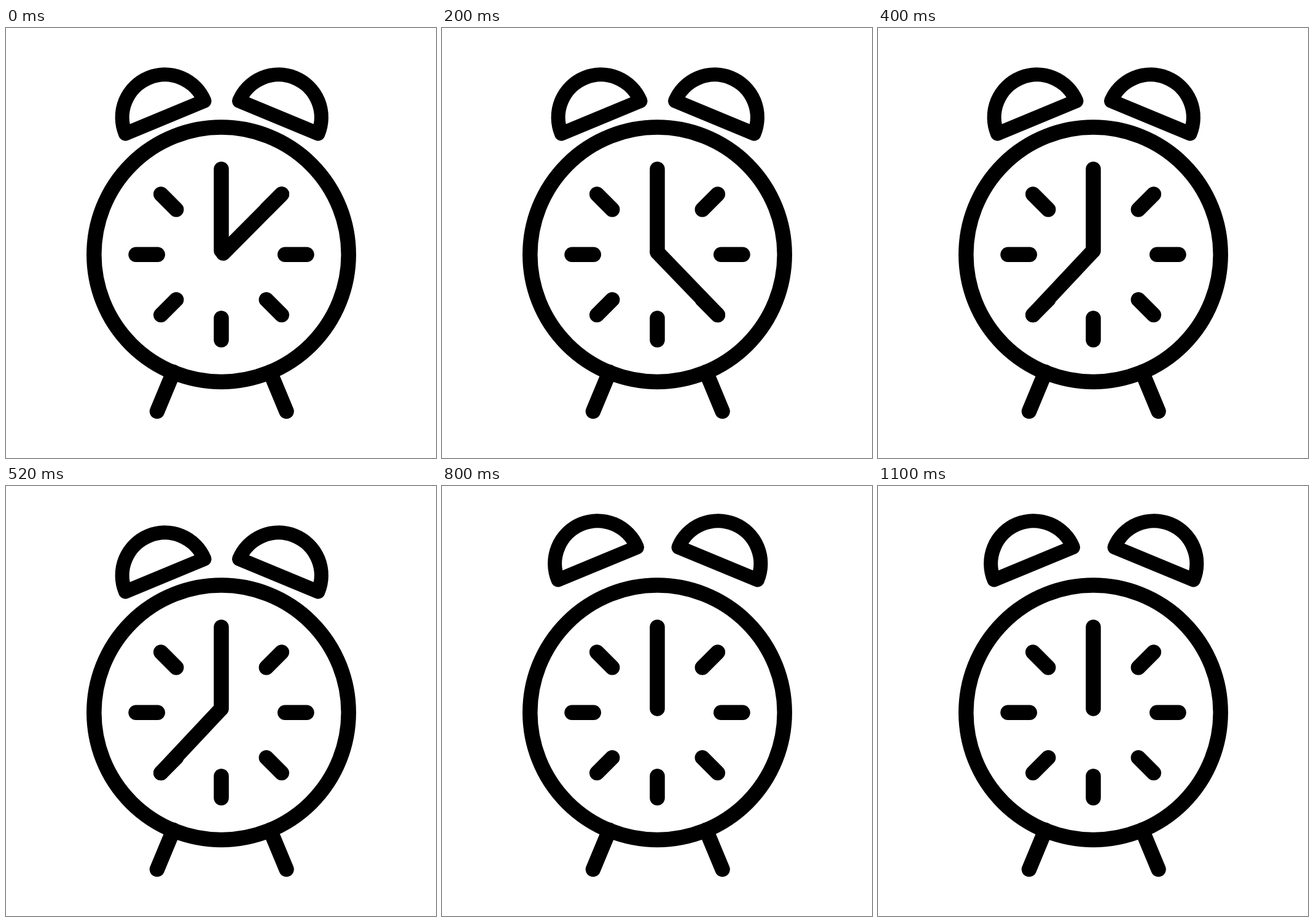
Recreate the animation shown at these times as an HTML page with a canvas. Size 700 by 700 pixels, loop 1200 ms.

```html
<!DOCTYPE html>
<html lang="en">
<head>
<meta charset="utf-8">
<title>Alarm clock</title>
<style>
  html, body { margin: 0; width: 100%; height: 100%; overflow: hidden; background: #fff; }
  canvas { display: block; width: 100vw; height: 100vh; object-fit: contain; }
</style>
</head>
<body>
<canvas id="stage" width="700" height="700"></canvas>
<script>
const ctx = document.getElementById('stage').getContext('2d');
const LOOP = 1200;
const STEP = 200;
const CENTER = { x: 350.5, y: 368.8 };
const MIRROR_X = 351.25;
const TICK_INNER = 103.7;
const TICK_OUTER = 139;

// Inner end of the moving hand at each of its four stops.
const HAND_PIVOTS = [[353.5, 366.5], [350.5, 365], [349.8, 363.2], [349.5, 370]];

function line(x1, y1, x2, y2) {
  ctx.beginPath();
  ctx.moveTo(x1, y1);
  ctx.lineTo(x2, y2);
  ctx.stroke();
}

function onDial(radius, eighth) {
  const angle = eighth * Math.PI / 4;
  return [CENTER.x + radius * Math.sin(angle), CENTER.y - radius * Math.cos(angle)];
}

function mirrored(draw) {
  draw();
  ctx.save();
  ctx.translate(2 * MIRROR_X, 0);
  ctx.scale(-1, 1);
  draw();
  ctx.restore();
}

// A half disc, tilted by an eighth of a half turn.
function bell(raised) {
  const x = raised ? 253.2 : 258.7;
  const y = raised ? 126.3 : 145.4;
  const tilt = -Math.PI / 8;
  ctx.lineWidth = 23.2;
  ctx.beginPath();
  ctx.arc(x, y, 69.5, tilt + Math.PI, tilt);
  ctx.closePath();
  ctx.stroke();
}

function leg() {
  line(246, 624, 272.6, 560);
}

function draw(time) {
  const stop = Math.floor(time / STEP);
  const ringing = time >= 800 && time < 900 || time >= 1100;

  ctx.fillStyle = '#fff';
  ctx.fillRect(0, 0, 700, 700);
  ctx.strokeStyle = '#000';
  ctx.lineCap = ctx.lineJoin = 'round';

  mirrored(() => bell(ringing));
  ctx.lineWidth = 24.5;
  mirrored(leg);

  ctx.beginPath();
  ctx.arc(CENTER.x, CENTER.y, 207.2, 0, 2 * Math.PI);
  ctx.stroke();

  for (let i = 1; i < 8; i++) {
    line(...onDial(TICK_INNER, i), ...onDial(TICK_OUTER, i));
  }
  line(CENTER.x, 229.7, CENTER.x, 362.4);

  if (stop < HAND_PIVOTS.length) {
    line(...HAND_PIVOTS[stop], ...onDial(TICK_OUTER, 2 * stop + 1));
  }
}

let start;
function tick(now) {
  start ??= now;
  draw((now - start) % LOOP);
  requestAnimationFrame(tick);
}
draw(0);
requestAnimationFrame(tick);
</script>
</body>
</html>
```
